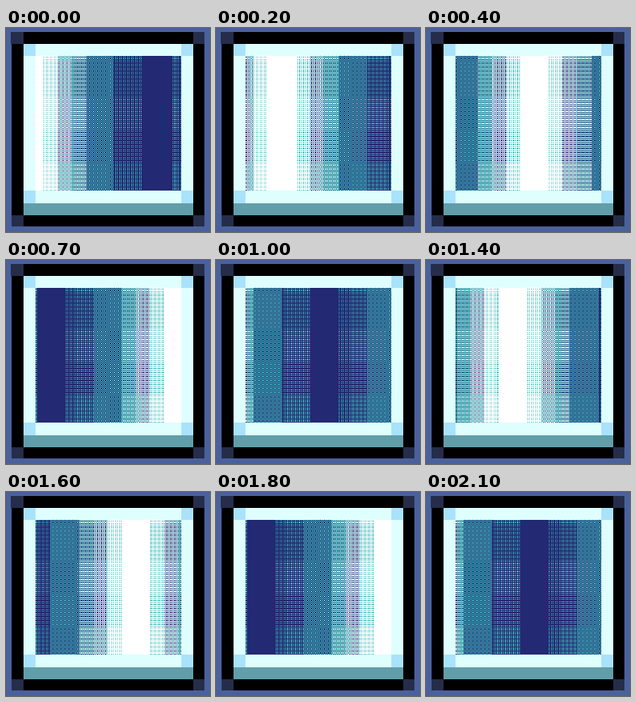
Write an HTML page with a canvas that moves like this. It is 256 by 256 pixels and loops after 2200 ms.

```html
<!DOCTYPE html>
<html lang="en">
<head>
<meta charset="utf-8">
<title>Sliding dithered shine</title>
<style>
html, body { margin: 0; width: 100%; height: 100%; overflow: hidden; background: #4a619c; }
canvas { display: block; width: 100vw; height: 100vh; image-rendering: pixelated; }
</style>
</head>
<body>
<canvas id="stage" width="256" height="256"></canvas>
<script>
const ctx = document.getElementById('stage').getContext('2d');
const NAVY = [35, 41, 115], TEAL = [66, 190, 190], WHITE = [255, 255, 255];
const LEFT = 37, TOP = 35, W = 183, H = 169;
const DOT = 256 / 206;         // size of one dither dot
const HALF = 160;              // distance from the bright crest to the dark one
const STEP = HALF / 6;         // travel per tick
const TICK = 100, TICKS = 11;
const BAYER = [[0, 2], [3, 1]];

function rect(color, x0, y0, x1, y1) {
  ctx.fillStyle = color;
  ctx.fillRect(x0, y0, x1 - x0, y1 - y0);
}

function corners(color, xs, ys) {
  for (const [x0, x1] of xs) for (const [y0, y1] of ys) rect(color, x0, y0, x1, y1);
}

function drawFrame() {
  rect('#4a619c', 0, 0, 256, 256);
  rect('#000', 7, 5, 249, 249);
  corners('#252d4a', [[7, 22], [235, 249]], [[5, 20], [235, 249]]);
  rect('#252d4a', 6, 5, 7, 20);
  rect('#dfffff', 22, 20, 235, 220);
  corners('#a9e2fb', [[22, 37], [220, 235]], [[20, 35], [204, 220]]);
  rect('#629daa', 22, 220, 235, 235);
}

const panel = ctx.createImageData(W, H);
const dotAt = pos => Math.floor((pos + 0.5) / DOT);

// Each dot of the 2x2 cell turns white and navy at its own distance.
function shade(dist, rank) {
  const white = HALF / 9 * (4 - rank);
  if (dist < white) return WHITE;
  return dist < white * 2 ? TEAL : NAVY;
}

function drawPanel(tick) {
  const crest = 136 + (tick - 4) * STEP;
  for (let x = 0; x < W; x++) {
    const col = dotAt(x + LEFT);
    const turn = ((col + 0.5) * DOT - crest + 4 * HALF) % (2 * HALF);
    const dist = Math.min(turn, 2 * HALF - turn);
    for (let y = 0; y < H; y++) {
      const rank = BAYER[dotAt(y + TOP) & 1][col & 1];
      const i = (y * W + x) * 4;
      panel.data.set(shade(dist, rank), i);
      panel.data[i + 3] = 255;
    }
  }
  ctx.putImageData(panel, LEFT, TOP);
}

let shown = -1;
function render() {
  const tick = Math.floor(performance.now() / TICK) % TICKS;
  if (tick !== shown) {
    drawPanel(tick);
    shown = tick;
  }
  requestAnimationFrame(render);
}

drawFrame();
render();
</script>
</body>
</html>
```
